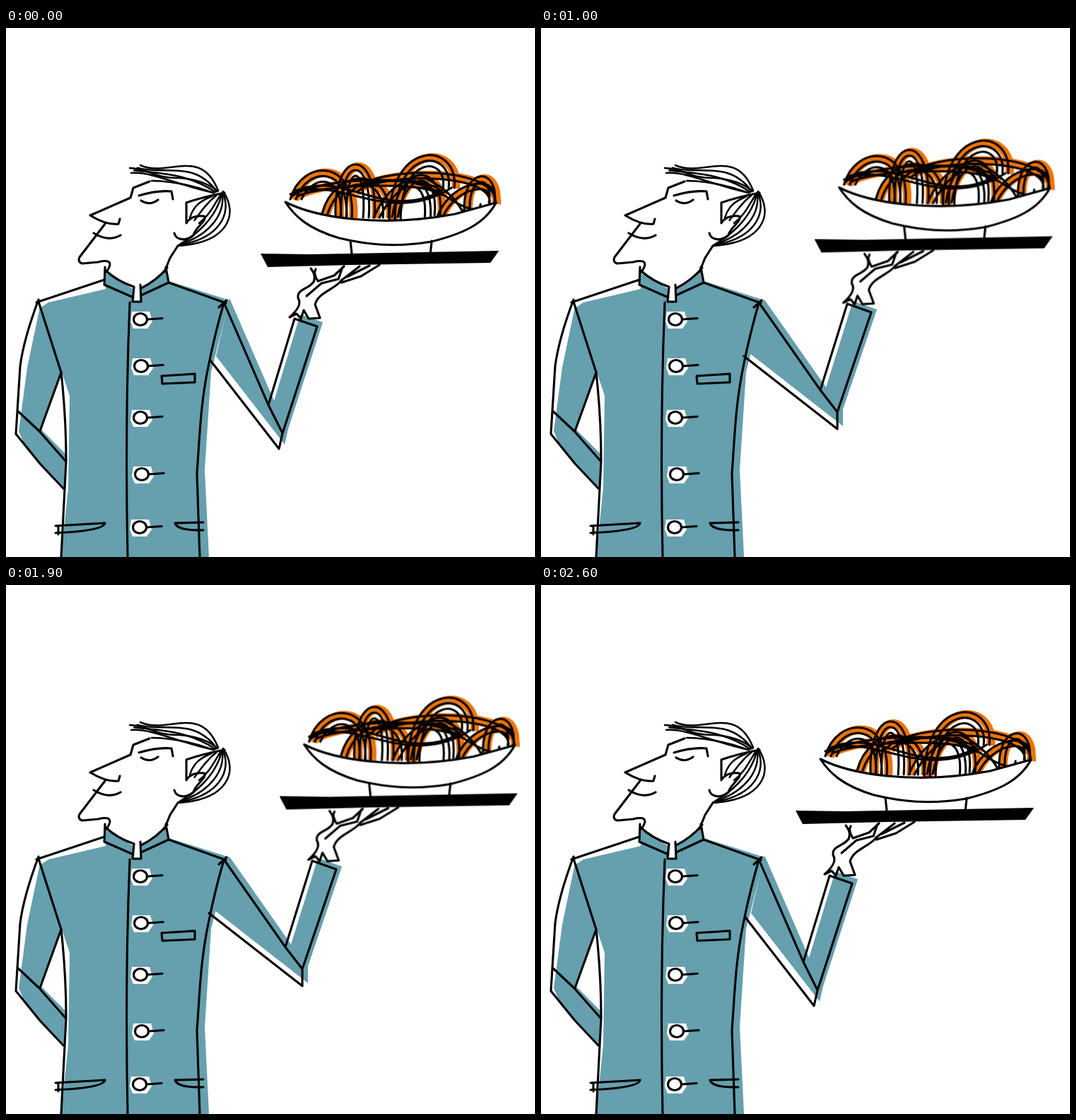
An HTML page that plays this animation: 748 by 748 pixels, repeating every 2.7 s.

```html
<!DOCTYPE html>
<html lang="en">
<head>
<meta charset="utf-8">
<title>Waiter with noodles</title>
<style>
html, body { margin: 0; width: 100%; height: 100%; overflow: hidden; background: #fff; }
svg { display: block; width: 100vw; height: 100vh; }
.ink { fill: none; stroke: #000; stroke-width: 3.1; stroke-linecap: round; stroke-linejoin: round; }
.cloth { fill: #669fad; }
.white { fill: #fff; }
.sauce { fill: none; stroke: #ee7408; stroke-width: 12; }
.hair { stroke-width: 2.5; }

/* nine steps of 100 ms: up through five poses and back */
.plate { transform-origin: 530px 325px; animation: lift .9s step-end infinite; }
.arm { visibility: hidden; animation: .9s step-end infinite; }
@keyframes lift {
  0%, 88.88%, 100% { transform: none; }
  11.11%, 77.77% { transform: translate(26.5px, -20.5px); }
  22.22%, 66.66% { transform: translate(49.5px, -63.5px) rotate(1.1deg); }
  33.33%, 55.55% { transform: translate(46.3px, -110.5px) rotate(-.25deg); }
  44.44% { transform: translate(39px, -121.5px) rotate(-.8deg); }
}
@keyframes low { 0%, 88.88%, 100% { visibility: visible; } 11.11% { visibility: hidden; } }
@keyframes rise { 0%, 22.22%, 88.88%, 100% { visibility: hidden; } 11.11%, 77.77% { visibility: visible; } }
@keyframes mid { 0%, 33.33%, 77.77%, 100% { visibility: hidden; } 22.22%, 66.66% { visibility: visible; } }
@keyframes high { 0%, 44.44%, 66.66%, 100% { visibility: hidden; } 33.33%, 55.55% { visibility: visible; } }
@keyframes top { 0%, 55.55%, 100% { visibility: hidden; } 44.44% { visibility: visible; } }
</style>
</head>
<body>
<svg viewBox="0 0 748 748">
  <path class="cloth" d="M139 345L180 369V386H191V368L227 343 231 358 316 385 290 486 281 625 287 748H78L88 650 90 520 79 487 48 396 60 388 141 369Z"/>
  <path class="cloth" d="M48 394L78 487 48 566 84 602 82 650 28 594 18 570 30 480Z"/>

  <g id="arms"></g>

  <path class="white" d="M182 365H189V384H181Z"/>
  <g id="buttons"></g>

  <g class="ink">
    <path class="collar" d="M140 338L139 363 180 381M140 342Q157 358 181 366L179 387H191L190 363"/>
    <path class="collar" d="M191 378L230 360 226 338M191 368Q213 357 228 339"/>
    <path class="shoulder" d="M139 356L43 388M230 360L311 389M301 395L312 385"/>
    <path class="sleeve" d="M46 384Q25 440 20 478L14 574 48 616 81 651M46 387L78 487 48 570M16 541L47 570 84 612"/>
    <path class="side" d="M78 487Q85 550 85 612L78 748M308 389Q296 430 287 474C275 530 274 575 270 630L274 748"/>
    <path class="front" d="M175 388Q168 560 172 748"/>
    <path class="pocket" d="M220 492L267 489V501L221 503Z"/>
    <path class="pocket" d="M70 704L140 700Q138 711 70 714M74 704V716M279 699L239 700Q242 711 279 710"/>
    <path class="face" d="M203 217L180 226 176 240 119 265Q142 279 159 277L161 270M140 277L104 324Q101 331 108 333L130 331Q156 325 142 345"/>
    <path class="face" d="M124 290Q145 303 162 293M191 244Q203 252 215 243M188 237Q215 229 234 231L236 242"/>
    <path class="ear" d="M309 233Q278 239 255 247V276Q262 264 280 266C286 271 266 284 265 293 254 303 240 299 238 290"/>
    <path class="neck" d="M243 308L232 325 224 345"/>
    <g class="hair" id="hair"></g>
  </g>

  <g class="plate">
    <path id="sauce" class="sauce" transform="translate(4 1)"/>
    <path id="strands" class="ink"/>
    <path class="ink" style="fill:#fff" d="M395 246Q430 264 489 270 562 277 635 263L693 247C676 278 645 291 602 302 548 311 509 306 471 297 427 284 408 266 395 246Z"/>
    <path class="ink" d="M487 301L489 320M602 301L600 319"/>
    <path d="M360 319L430 320 697 315 685 332 490 335 370 338Z"/>
    <g class="ink">
      <path class="thumb" d="M431 340Q439 350 435 359C427 370 411 369 413 382Q420 392 401 409L411 404 417 411 421 399 428 411 444 410 437 391C441 374 466 369 474 357"/>
      <path class="finger" d="M438 341Q434 347 441 358L464 350 478 337M425 379L446 361 470 355 476 338"/>
      <path class="finger" d="M474 357L500 337M474 360L502 351 528 335M482 352L514 336"/>
    </g>
  </g>
</svg>
<script>
const $ = id => document.getElementById(id);
const path = (cls, d, extra = '') => `<path class="${cls}" d="${d}" ${extra}/>`;
const line = (...pts) => 'M' + pts.join('L');

// joints: armpit, inner elbow, crease, outer elbow, cuff left, cuff right; colour sits off register
const shoulder = [308, 388];
const arm = (name, shift, pit, inner, crease, outer, left, right) =>
  `<g class="arm" style="animation-name:${name}">` +
  path('cloth', line(shoulder, inner, left, right, crease, outer, pit) + 'Z', `transform="translate(${shift})"`) +
  path('ink', line(shoulder, inner, crease) + line(pit, outer, crease, right, left, inner)) + '</g>';
$('arms').innerHTML =
  arm('low', [8, -6], [289, 470], [371, 533], [391, 573], [386, 595], [408, 411], [440, 422]) +
  arm('rise', [8, -4], [287, 464], [395, 512], [419, 543], [419, 567], [433, 390], [467, 402]) +
  arm('mid', [6, -2], [297, 457], [419, 467], [454, 493], [456, 514], [448, 345], [488, 353]) +
  arm('high', [6, -1], [297, 456], [430, 440], [465, 457], [473, 474], [429, 306], [467, 305]) +
  arm('top', [6, -1], [297, 454], [430, 431], [467, 445], [476, 461], [422, 297], [461, 295]);

const button = (x, y) =>
  path('white', `M${x - 12} ${y - 11}h25l4 14-7 10h-20l-4-10z`) +
  `<ellipse class="ink" style="fill:#fff" cx="${x}" cy="${y}" rx="9.5" ry="8.5"/>` +
  path('ink', `M${x + 10} ${y}l21-1.5`);
$('buttons').innerHTML =
  button(190, 412) + button(191, 478) + button(190, 551) + button(192, 631) + button(189, 706);

// strands blended between two edge curves
const blend = (a, b, n) => Array.from({ length: n }, (_, i) => {
  const p = a.map((v, k) => v + (b[k] - v) * i / (n - 1));
  return path('', `M${p.slice(0, 2)}C${p.slice(2)}`);
}).join('');
$('hair').innerHTML =
  blend([190, 194, 228, 212, 275, 167, 300, 230], [177, 205, 208, 203, 245, 223, 294, 233], 4) +
  path('', 'M175 198C202 199 211 213 244 212Q280 214 299 231M206 216Q250 217 293 233') +
  blend([307, 231, 330, 265, 312, 304, 243, 308], [305, 235, 300, 259, 280, 286, 247, 305], 4) +
  blend([304, 235, 294, 250, 288, 265, 273, 276], [291, 238, 274, 245, 265, 252, 260, 268], 3);

// each noodle loop is an arch with n nested strands
const loops = [
  [402, 242, 489, 268, 202, 16, 3],
  [466, 268, 521, 268, 193, -4, 3],
  [447, 262, 541, 268, 213, 18, 2],
  [404, 238, 616, 236, 215, 40, 2],
  [488, 232, 692, 248, 205, 30, 2],
  [542, 271, 634, 226, 181, 0, 3],
  [546, 267, 614, 265, 208, 12, 2],
  [648, 262, 691, 247, 210, -4, 2],
  [610, 266, 690, 238, 221, 22, 2],
  [520, 268, 600, 270, 216, 30, 2]
];
const arch = ([x, y, u, v, top, lean], inset) => {
  const peak = (y + v) / 2 - ((y + v) / 2 - top - inset) / .75;
  return `M${x + inset} ${y}C${x + inset + lean} ${peak} ${u - inset + 6} ${peak} ${u - inset} ${v}`;
};
const waves = 'M402 235C470 205 540 283 630 226M410 230C480 200 535 275 616 230M503 222Q570 205 620 237T671 249M592 212Q629 229 646 260';
$('sauce').setAttribute('d', loops.slice(0, 9).map(l => arch(l, 2)).join(''));
$('strands').setAttribute('d', waves + loops.map(l =>
  Array.from({ length: l[6] }, (_, k) => arch(l, k * 8)).join('')).join(''));
</script>
</body>
</html>
```
